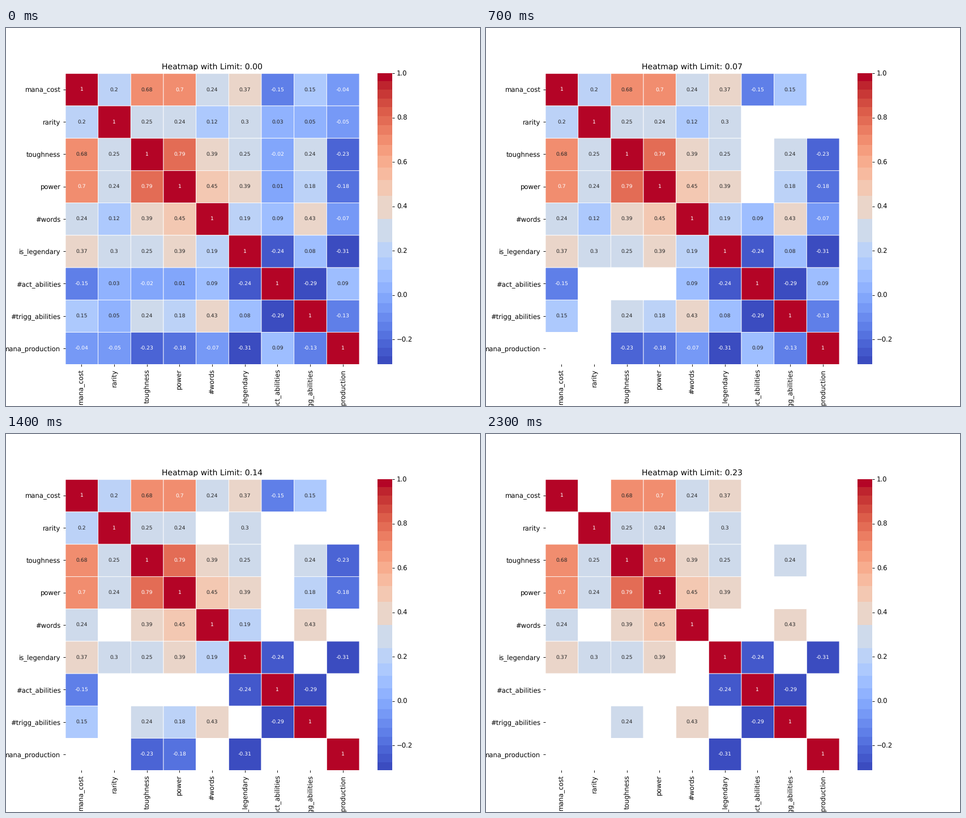
Recreate the animation shown at these times as a matplotlib script. Size 837 by 669 pixels, loop 2400 ms.

```python
import numpy as np
import matplotlib.pyplot as plt
from matplotlib.animation import FuncAnimation
from matplotlib.colors import ListedColormap

W, H, DPI = 837, 669, 83.7
FRAMES, INTERVAL = 24, 100
BANDS, SPREAD = 26, 0.71

NAMES = ["mana_cost", "rarity", "toughness", "power", "#words",
         "is_legendary", "#act_abilities", "#trigg_abilities",
         "mana_production"]

# Correlations below the diagonal, in hundredths, row by row
PAIRS = """20
68 25
70 24 79
24 11.8 39 45
37 30 25 39 19.2
-15 3 -2 1 8.8 -24
15 4.8 24 18 43 8 -29
-4 -5.2 -22.8 -18 -7 -31.3 9.2 -13"""


def correlation():
    n = len(NAMES)
    corr = np.zeros((n, n))
    corr[np.tril_indices(n, -1)] = [float(p) for p in PAIRS.split()]
    return corr + corr.T + 100 * np.eye(n)


def signed_power(x, p):
    return np.sign(x) * np.abs(x) ** p


def banded_cmap(levels=512):
    """Coolwarm in flat bands, wide in the middle and narrow at the ends."""
    x = (np.arange(levels) + 0.5) / levels * 2 - 1
    band = (signed_power(x, 1 / SPREAD) + 1) / 2 * BANDS
    tones = signed_power(np.linspace(-1, 1, BANDS), SPREAD)
    return ListedColormap(
        plt.get_cmap("coolwarm")((tones[band.astype(int)] + 1) / 2))


plt.rcParams.update({"font.family": "DejaVu Sans", "text.hinting": "none"})
corr = correlation()
n = len(NAMES)

fig = plt.figure(figsize=((W + 0.01) / DPI, (H + 0.01) / DPI), dpi=DPI,
                 facecolor="white")
ax = fig.add_subplot()
edges = np.arange(n + 1) + 0.007  # the grid sits half a pixel off the ticks
mesh = ax.pcolormesh(edges, edges, corr / 100, cmap=banded_cmap(),
                     vmin=corr.min() / 100, vmax=1, linewidths=0.72,
                     edgecolor="white", antialiased=True, snap=False)
ax.set(xlim=(0, n), ylim=(n, 0))
ax.spines[:].set_visible(False)
ax.set_xticks(np.arange(n) + 0.5, NAMES, rotation=90)
ax.set_yticks(np.arange(n) + 0.5, NAMES)
bar = fig.colorbar(mesh, ax=ax)
bar.outline.set_linewidth(0)
title = ax.set_title("")

labels = {}
for (i, j), c in np.ndenumerate(corr):
    color = "0.15" if 0 < c < 69 else "white"
    labels[i, j] = ax.text(j + 0.5, i + 0.5, f"{round(c / 100, 2):.2g}",
                           ha="center", va="center", fontsize=8, color=color)


def update(k):
    hidden = np.abs(corr) < k
    mesh.set_array(np.ma.array(corr / 100, mask=hidden))
    for cell, label in labels.items():
        label.set_visible(not hidden[cell])
    title.set_text(f"Heatmap with Limit: {k / 100:.2f}")
    return [mesh, title, *labels.values()]


anim = FuncAnimation(fig, update, frames=FRAMES, interval=INTERVAL,
                     init_func=lambda: update(0), repeat=True,
                     repeat_delay=0, blit=False)
plt.show()
```
